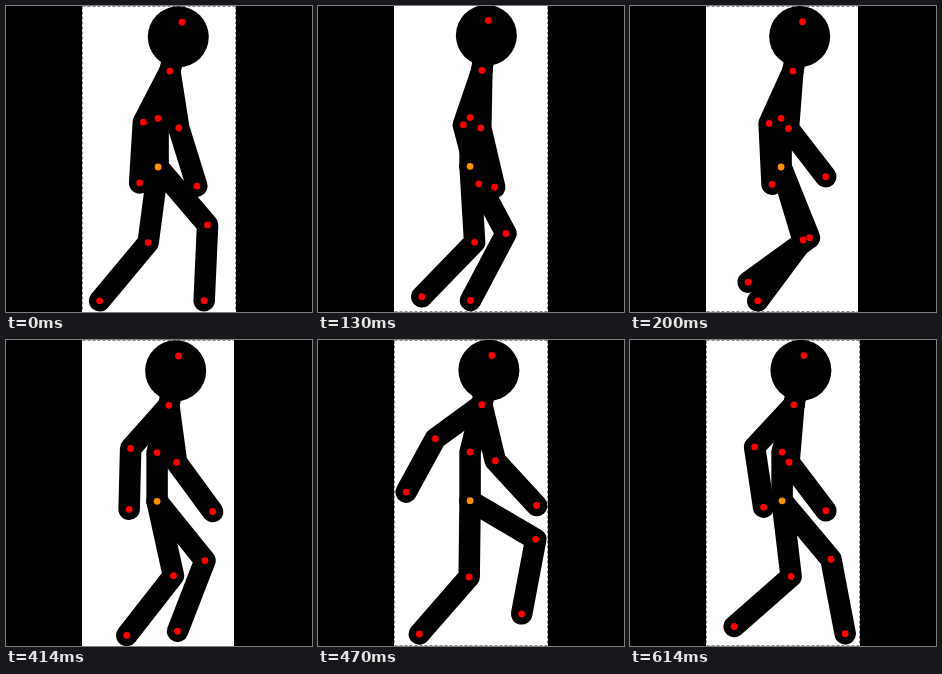
Recreate the animation shown at these times as an HTML page with a canvas. Size 306 px wide and 306 px high, loop 0.67 s.

```html
<!DOCTYPE html>
<html>
<head>
<meta charset="utf-8">
<title>Walking stick figure</title>
<style>
html, body { margin: 0; height: 100%; overflow: hidden; background: #000; }
canvas { display: block; }
</style>
</head>
<body>
<canvas id="stage" width="306" height="306"></canvas>
<script>
const ctx = document.getElementById('stage').getContext('2d');
const SIZE = 306, LEFT = 76, LIMB = 21.5, HEAD = 30.5, LOOP = 670;
const SPINE = 48.7, NECK = 50.3, ARM = [57.6, 60.9], LEG = [76.2, 75.8];

// Angles are degrees from straight down, positive to the right: [upper, lower].
// nod tilts the head from upright; edges are the dashed sides of the panel.
const poses = [
  { end: 130, right: 230, edges: 'tlr', hipY: 161, nod: 13.8,
    arms: [[-27.4, -3.5], [8.9, 17.3]], legs: [[-7.5, -39.8], [40.5, -2.6]] },
  { end: 200, right: 230, edges: 'rb', hipY: 160.3, nod: 7.3,
    arms: [[-18.8, 14.7], [-1.1, 13.2]], legs: [[3.4, -44.2], [28.1, -27.9]] },
  { end: 330, right: 228, edges: 'tb', hipY: 161, nod: 11.1,
    arms: [[-24.4, 2.8], [-4.4, 37.7]], legs: [[16.7, -36.6], [21.9, -54.1]] },
  { end: 470, right: 228, edges: 't', hipY: 161.3, nod: 11.1,
    arms: [[-41.6, -1.4], [7.7, 36.3]], legs: [[12.4, -38], [38.9, -21.2]] },
  { end: 530, right: 230, edges: 'tlrb', hipY: 160.7, nod: 11.5,
    arms: [[-53.9, -28.7], [13.5, 42.7]], legs: [[-0.7, -41.1], [59.5, -10.7]] },
  { end: LOOP, right: 230, edges: 'tlrb', hipY: 160.8, nod: 11.5,
    arms: [[-43, 8.5], [-4.8, 37.2]], legs: [[6.8, -48.7], [39.9, 10.8]] }
];

function step([x, y], length, degrees) {
  const a = degrees * Math.PI / 180;
  return [x + length * Math.sin(a), y + length * Math.cos(a)];
}

function limb(start, lengths, angles) {
  const middle = step(start, lengths[0], angles[0]);
  return [start, middle, step(middle, lengths[1], angles[1])];
}

function dot([x, y], r, color) {
  ctx.fillStyle = color;
  ctx.beginPath();
  ctx.arc(x, y, r, 0, 2 * Math.PI);
  ctx.fill();
}

function line(points) {
  ctx.beginPath();
  points.forEach(p => ctx.lineTo(...p));
  ctx.stroke();
}

function drawPanel({ right, edges }) {
  ctx.fillStyle = '#000';
  ctx.fillRect(0, 0, SIZE, SIZE);
  ctx.fillStyle = '#fff';
  ctx.fillRect(LEFT, 0, right - LEFT, SIZE);
  const l = LEFT + 0.5, r = right - 0.5, t = 0.5, b = SIZE - 0.5;
  const sides = { t: [[l, t], [r, t]], l: [[l, t], [l, b]], r: [[r, t], [r, b]], b: [[l, b], [r, b]] };
  ctx.lineWidth = 1;
  ctx.lineCap = 'butt';
  ctx.strokeStyle = '#888';
  ctx.setLineDash([3, 2]);
  for (const e of edges) line(sides[e]);
  ctx.setLineDash([]);
}

function drawFigure({ right, hipY, nod, arms, legs }) {
  const hip = [(LEFT + right) / 2 - 0.9, hipY];
  const chest = step(hip, SPINE, 180);
  const neck = step(chest, SPINE, 166);
  const crown = step(neck, NECK, 180 - nod);
  const parts = [
    [hip, chest, neck, crown],
    ...arms.map(a => limb(neck, ARM, a)),
    ...legs.map(a => limb(hip, LEG, a))
  ];
  ctx.lineWidth = LIMB;
  ctx.lineCap = ctx.lineJoin = 'round';
  ctx.strokeStyle = '#000';
  parts.forEach(line);
  dot(step(neck, 0.7 * NECK, 180 - nod), HEAD, '#000');
  for (const joint of new Set(parts.flat())) dot(joint, 3.4, joint === hip ? '#ff9000' : '#f00');
}

function frame() {
  const t = performance.now() % LOOP;
  const pose = poses.find(p => t < p.end);
  drawPanel(pose);
  drawFigure(pose);
  requestAnimationFrame(frame);
}
frame();
</script>
</body>
</html>
```
